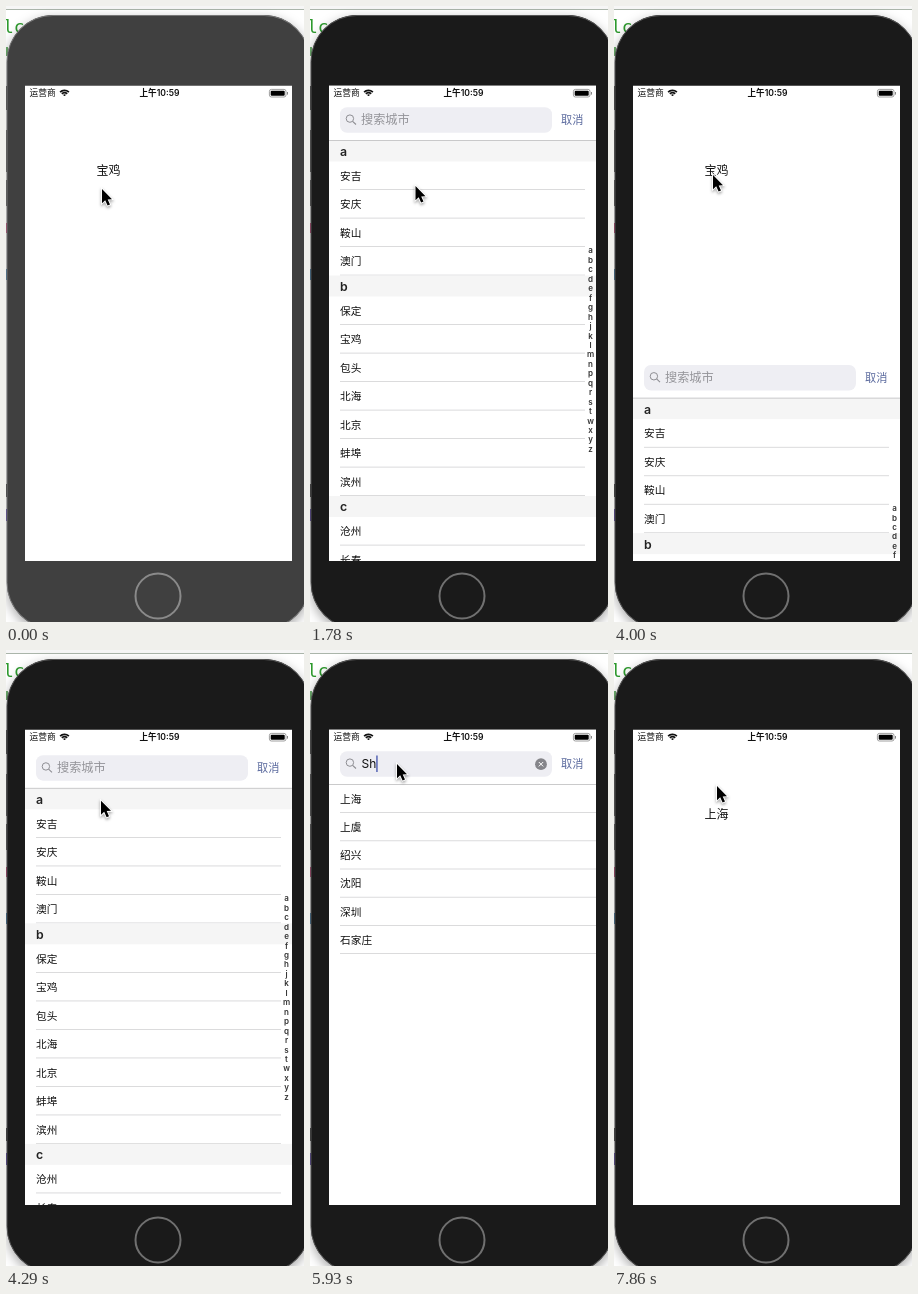
Write an HTML page with a canvas that moves like this. It is 298 px wide and 616 px high and loops after 8 s.

```html
<!DOCTYPE html>
<html lang="zh">
<head>
<meta charset="utf-8">
<style>
  html, body { margin: 0; width: 100%; height: 100%; overflow: hidden; background: #fff; }
  canvas { display: block; }
</style>
</head>
<body>
<canvas id="stage" width="298" height="616"></canvas>
<script>
const ctx = document.getElementById('stage').getContext('2d');
const LOOP = 8000, STEP = LOOP / 54;
const SANS = 'Inter, "Noto Sans CJK SC", "Noto Sans CJK", sans-serif';
const SCREEN = { x: 19, y: 79.5, w: 267, h: 475.5 };
const ROW = 28.5, HEADER = 21, LIST_TOP = 134.5;

const sections = {
  a: ['安吉', '安庆', '鞍山', '澳门'],
  b: ['保定', '宝鸡', '包头', '北海', '北京', '蚌埠', '滨州'],
  c: ['沧州', '长春'],
};
const matches = {
  S: ['上海', '上虞', '绍兴', '沈阳', '深圳', '石家庄', '苏州', '绥化'],
  Sh: ['上海', '上虞', '绍兴', '沈阳', '深圳', '石家庄'],
  Shan: ['上海', '上虞', '汕头'],
  Shang: ['上海', '上虞'],
};
// tick, x, y of the pointer tip
const pointerPath = [
  [0, 96, 183], [3, 101, 159], [10, 101, 159], [12, 105.5, 180], [15, 95, 333],
  [21, 95, 333], [24, 99, 169], [28, 99, 169], [31, 87, 114], [46, 87, 114],
  [48, 103, 136], [54, 103, 136],
];

function text(str, x, cy, size, color = '#111', weight = 400, align = 'left') {
  ctx.font = `${weight} ${size}px ${SANS}`;
  ctx.fillStyle = color;
  ctx.textAlign = align;
  ctx.fillText(str, x, cy + size * 0.37);
}

function rect(x, y, w, h, color) {
  ctx.fillStyle = color;
  ctx.fillRect(x, y, w, h);
}

function roundRect(x, y, w, h, r, fill, stroke) {
  ctx.beginPath();
  ctx.roundRect(x, y, w, h, r);
  if (fill) { ctx.fillStyle = fill; ctx.fill(); }
  if (stroke) { ctx.strokeStyle = stroke; ctx.stroke(); }
}

function line(points, color, width = 1) {
  ctx.beginPath();
  points.forEach(([x, y]) => ctx.lineTo(x, y));
  ctx.strokeStyle = color;
  ctx.lineWidth = width;
  ctx.stroke();
}

function arc(x, y, r, color, width, from = 0, to = 2 * Math.PI) {
  ctx.beginPath();
  ctx.arc(x, y, r, from, to);
  ctx.strokeStyle = color;
  ctx.lineWidth = width;
  ctx.stroke();
}

function drawBackdrop() {
  rect(0, 0, 298, 616, '#fff');
  rect(0, 0, 298, 3, '#f6f6f6');
  rect(0, 3, 298, 1, '#aab5aa');
  ctx.font = '18px "DejaVu Sans Mono", monospace';
  ctx.fillStyle = '#2e9a2e';
  ctx.textAlign = 'left';
  ctx.fillText('lc', -3, 27);
  rect(0, 41, 2, 9, '#6fae6f');
  [[80, 24, '#444'], [124, 42, '#555'], [174, 26, '#555'], [217, 10, '#d0407a'],
   [263, 11, '#3a80b0'], [478, 13, '#333'], [503, 12, '#5a3fb0']]
    .forEach(([y, h, color]) => rect(0, y, 1.5, h, color));
}

function drawPhone(active) {
  ctx.save();
  ctx.shadowColor = 'rgba(0,0,0,.35)';
  ctx.shadowBlur = 12;
  ctx.shadowOffsetY = 4;
  roundRect(1, 9, 303, 614, 46, active ? '#1a1a1a' : '#404040');
  ctx.restore();
  ctx.lineWidth = 1;
  roundRect(1, 9.5, 303, 613, 46, null, active ? '#555' : '#777');
  arc(152, 590, 22.5, active ? '#707070' : '#8a8a8a', 2);
}

function drawStatusBar() {
  text('运营商', 23.5, 87, 8.7);
  for (const r of [1.2, 3.6, 6]) arc(58.5, 90.3, r, '#111', 1.7, -Math.PI * .76, -Math.PI * .24);
  text('上午10:59', 153.5, 87, 8.6, '#111', 600, 'center');
  ctx.lineWidth = .8;
  roundRect(263.4, 83.4, 16.6, 7.6, 2, null, '#888');
  roundRect(264.7, 84.7, 14, 5, 1, '#000');
  rect(281, 86, 1, 2.6, '#888');
}

function drawRow(name, y, right, selected) {
  if (selected) rect(SCREEN.x, y, SCREEN.w, ROW, '#d9d9d9');
  text(name, 30, y + 14.3, 10.7);
  rect(30, y + ROW - .8, right - 30, .8, '#d2d2d4');
}

function drawCities(selected) {
  let y = LIST_TOP;
  for (const [letter, names] of Object.entries(sections)) {
    rect(SCREEN.x, y, SCREEN.w, HEADER, '#f5f5f5');
    text(letter, 30, y + 10.8, 12.3, '#222', 600);
    y += HEADER;
    for (const name of names) {
      drawRow(name, y, 275, name === selected);
      y += ROW;
    }
  }
  [...'abcdefghjklmnpqrstwxyz'].forEach((letter, i) =>
    text(letter, 280.5, 244.5 + i * 9.45, 8, '#333', 600, 'center'));
}

function drawPanel(offset, query, caret, selected) {
  ctx.save();
  ctx.translate(0, offset);
  rect(SCREEN.x, SCREEN.y, SCREEN.w, SCREEN.h, '#fff');
  roundRect(30, 101.3, 212, 25.5, 7, '#eeeef3');
  arc(39.9, 112.6, 3.7, '#8e8e93', 1);
  line([[42.6, 115.3], [46, 118.5]], '#8e8e93', 1.1);
  if (query) {
    text(query, 51.5, 113.8, 12);
    ctx.beginPath();
    ctx.arc(231, 114.2, 5.9, 0, 7);
    ctx.fillStyle = '#85858a';
    ctx.fill();
    line([[228.8, 112], [233.2, 116.4]], '#fff');
    line([[233.2, 112], [228.8, 116.4]], '#fff');
  } else {
    text('搜索城市', 51, 113.6, 12.2, '#949499');
  }
  if (caret) {
    const x = query ? 51.5 + ctxWidth(query) : 51.2;
    rect(x, 105.5, 1.3, 16.5, `rgba(63,80,170,${caret})`);
  }
  text('取消', 251, 114, 11.2, '#5b6a9e');
  if (query) matches[query].forEach((name, i) =>
    drawRow(name, LIST_TOP + i * 28.2, 286, name === selected));
  else drawCities(selected);
  rect(SCREEN.x, 134, SCREEN.w, .9, '#c4c4c6');
  ctx.restore();
}

function ctxWidth(str) {
  ctx.font = `400 12px ${SANS}`;
  return ctx.measureText(str).width;
}

function drawPointer(tick) {
  const next = pointerPath.findIndex(p => p[0] > tick);
  const [t0, x0, y0] = pointerPath[next - 1], [t1, x1, y1] = pointerPath[next];
  const k = (tick - t0) / (t1 - t0);
  ctx.save();
  ctx.translate(x0 + (x1 - x0) * k, y0 + (y1 - y0) * k);
  ctx.beginPath();
  [[0, 0], [0, 14.2], [3.2, 11.2], [5.6, 16.6], [8, 15.6], [5.7, 10.4], [10, 10.2]]
    .forEach(([x, y]) => ctx.lineTo(x, y));
  ctx.closePath();
  ctx.shadowColor = 'rgba(0,0,0,.4)';
  ctx.shadowBlur = 3;
  ctx.shadowOffsetY = 1.5;
  ctx.strokeStyle = '#fff';
  ctx.lineWidth = 1.8;
  ctx.stroke();
  ctx.shadowColor = 'transparent';
  ctx.fillStyle = '#000';
  ctx.fill();
  ctx.restore();
}

// critically damped slide: 1 at the start, settling to 0
function settle(ms) {
  const x = Math.max(0, ms) * .018;
  return (1 + x) * Math.exp(-x);
}

function panelOffset(ms) {
  const [openA, closeA, openB, closeB] = [772, 2880, 3914, 7320];
  const away = ms < closeA ? settle(ms - openA)
    : ms < openB ? 1 - settle(ms - closeA)
    : ms < closeB ? settle(ms - openB)
    : 1 - settle(ms - closeB);
  return away * SCREEN.h;
}

function render(now) {
  const tick = Math.floor((now % LOOP + 8) / STEP) % 54;
  const query = tick < 39 ? '' : ['S', 'Sh', 'Shan', 'Shang'][Math.min(tick - 39, 3)];
  const caret = tick < 35 || tick > 46 ? 0 : tick === 46 ? .35 : 1;
  const selected = tick >= 48 ? '上海' : tick >= 19 && tick < 25 ? '宝鸡' : '';

  drawBackdrop();
  drawPhone(tick >= 5);
  ctx.save();
  ctx.beginPath();
  ctx.rect(SCREEN.x, SCREEN.y, SCREEN.w, SCREEN.h);
  ctx.clip();
  rect(SCREEN.x, SCREEN.y, SCREEN.w, SCREEN.h, '#fff');
  text(tick >= 49 ? '上海' : '宝鸡', 90.5, 165, 12);
  const offset = panelOffset(tick * STEP);
  if (offset < SCREEN.h - 1) drawPanel(offset, query, caret, selected);
  drawStatusBar();
  ctx.restore();
  drawPointer(tick);
  requestAnimationFrame(loop);
}

const start = performance.now();
function loop() { render(performance.now() - start); }
loop();
</script>
</body>
</html>
```
